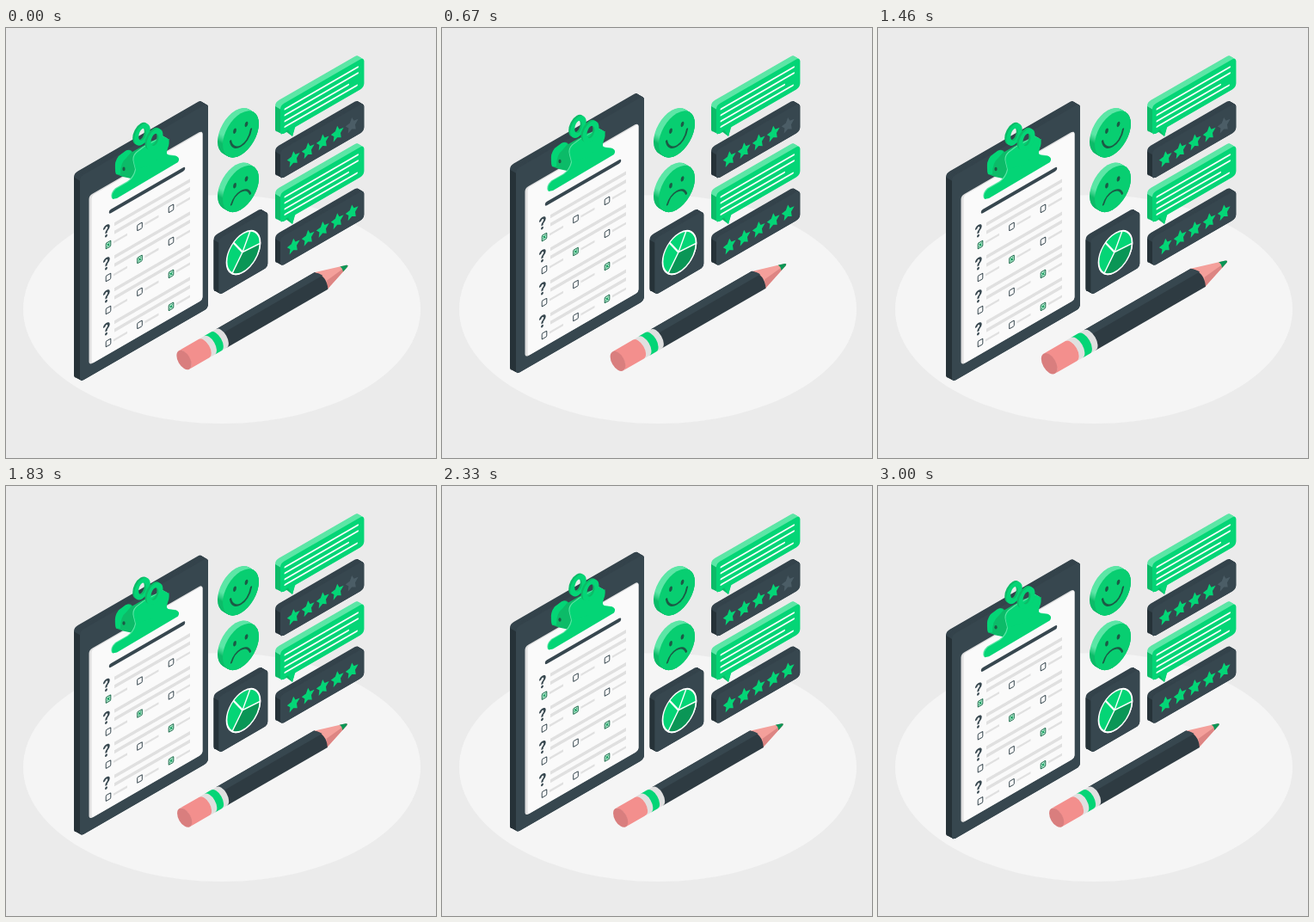
These frames come from a looping animation (500 by 500 pixels, 3040 ms). An HTML page:

```html
<!DOCTYPE html>
<html lang="en">
<head>
<meta charset="utf-8">
<title>Survey</title>
<style>
html, body { margin: 0; width: 100%; height: 100%; overflow: hidden; background: #ebebeb; }
svg { display: block; width: 100%; height: 100%; }
</style>
</head>
<body>
<svg id="stage" viewBox="0 0 500 500"></svg>
<script>
const GREEN = '#04d576', LIGHT = '#5ce6a6', SHADE = '#0cbb68', DEEP = '#0a9656';
const SLATE = '#37474f', DARK = '#263238', BODY = '#2e3b42', GREY = '#e0e0e0', INK = '#1c5a45';
const SLATES = [SLATE, '#34434b', DARK];

const range = n => [...Array(n).keys()];
const repeat = (n, f) => range(n).map(f).join('');

// Upright isometric plane: x in screen pixels, y straight down.
const plane = (x, y, s) => `<g transform="matrix(1 -.577 0 1 ${x} ${y})">${s}</g>`;
const path = (d, fill, more = '') => `<path d="${d}" fill="${fill}" ${more}/>`;
const line = (x1, x2, y, color, width, cap = 'butt') =>
  path(`M${x1} ${y}H${x2}`, 'none', `stroke="${color}" stroke-width="${width}" stroke-linecap="${cap}"`);
const rect = (x, y, w, h, r, fill) =>
  `<rect x="${x}" y="${y}" width="${w}" height="${h}" rx="${r}" fill="${fill}"/>`;

// Rounded panel with depth towards the upper left.
function slab(x, y, w, h, [front, top, left], inner, d = 6) {
  const r = 4.5, up = d * 7 / 6;
  return plane(x, y,
    repeat(13, i => rect(-d * (1 - i / 12), -up * (1 - i / 12), w, h, r, top)) +
    path(`M0 ${r}V${h - r}Q0 ${h - 1} 2 ${h - .5}L${2 - d} ${h - up}Q${-d} ${h - up - 1} ${-d} ${h - up - r}V${r - up}Z`, left) +
    rect(0, 0, w, h, r, front) + inner);
}

function question(i) {
  const y = 78 + 38 * i, checked = [0, 1, 2, 2][i];
  const boxes = repeat(3, k => {
    const x = 33 + 36.5 * k, on = k === checked;
    return line(x + 6, x + 22, y + 20.5, GREY, 2.6) +
      `<rect x="${x - 2.8}" y="${y + 16.5}" width="5.6" height="6.6" rx="1" fill="${on ? '#c9f5de' : 'none'}" stroke="${on ? '#1c6a4b' : SLATE}"/>` +
      (on ? path(`M${x - 1.5} ${y + 18}l3 3.6m0 -3.6l-3 3.6`, 'none', `stroke="${DEEP}"`) : '');
  });
  return line(40, 128, y, GREY, 4) + line(40, 128, y + 9.5, GREY, 4) + boxes +
    `<text transform="translate(31 ${y + 9.5}) scale(.87 1)" text-anchor="middle" font-family="Inter, Arial, sans-serif" font-weight="700" font-size="19" fill="${SLATE}">?</text>`;
}

function clip() {
  const plate = 'M124 197Q121.5 191 128 185L142 177Q149 172 151 163L149 155Q147 148 152 143L160 137L183 124L188.5 127Q191 131 188 138Q185 145 190 146L198 147Q203 149 200 154L129 196Z';
  const oval = (x, y, rx, color) => plane(x, y,
    `<ellipse rx="${rx}" ry="9.2" fill="none" stroke="${color}" stroke-width="5"/>`);
  const ring = (x, y, rx) => oval(x - 2, y - 1.2, rx, SHADE) + oval(x, y, rx, GREEN);
  return '<g transform="translate(0 2.2)">' + ring(158.5, 122, 6.8) +
    path('M127 165Q126 155 131 147L139 141Q144 138 147 142L170 129L190 127L186 146L150 174L136 171L128 168Z', SHADE) +
    path('M127 161Q126 153 131 147L139 141Q143 139 146 142L140 149Q133 154 133 168L128 168Z', GREEN) +
    `<ellipse cx="137" cy="162" rx="1.6" ry="2.3" fill="${INK}"/>` +
    `<g transform="translate(-1 -.6)">${path(plate, LIGHT)}</g>` + path(plate, GREEN) +
    ring(173, 128, 7) +
    path('M152 149Q153 145 157 142L161 136Q167 143 175 138L183 128L187 131L184 145L170 157L153 162Z', GREEN) + '</g>';
}

const clipboard = slab(86, 173.5, 149, 238.5, SLATES,
  rect(10.5, 28, 132, 197, 4, GREY) + rect(13.5, 29.5, 129, 195.5, 3, '#fafafa') +
  line(36, 120, 60.5, SLATE, 4.5, 'round') + repeat(4, question), 7) + clip();

function face(y, mouth) {
  const disc = (k, color) => plane(273 - k, y - k * .577, `<ellipse rx="21" ry="24.3" fill="${color}"/>`);
  return repeat(13, i => disc(6 - i / 2, 'url(#rim)')) + disc(0, '#08ce71') + plane(273, y,
    [-7, 6.5].map(x => `<ellipse cx="${x}" cy="-7.8" rx="1.9" ry="2.9" fill="${INK}"/>`).join('') +
    path(mouth, 'none', `stroke="${INK}" stroke-width="2.2" stroke-linecap="round"`));
}

const pie = slab(247.5, 245.3, 56.8, 65.5, SLATES,
  `<g transform="translate(28.5 32.2)" stroke="#fff" stroke-width="1.7" stroke-linejoin="round">
    <ellipse rx="19.5" ry="22.5" fill="${GREEN}"/>
    ${path('M-1 -1L19.5 .5A19.5 22.5 0 0 1 -13 16.8Z', DEEP)}
    ${path('M-1 -1L-11.5 -18M-1 -1L8 -20.5', 'none')}
  </g>`);

function bubble(y) {
  return slab(319, y, 97.3, 35, [GREEN, LIGHT, SHADE],
    path('M6 33.5L14 44L17 33.5Z', SHADE) + path('M9 33.5L14 44L18 33.5Z', GREEN) +
    [[7.5, 90], [14.5, 90], [21.5, 79], [28, 89]].map(([dy, end]) => line(5.5, end, dy, '#fff', 2, 'round')).join(''));
}

function rating(y, score) {
  const star = range(10).map(i => {
    const a = i * Math.PI / 5, r = i % 2 ? 4.6 : 9;
    return [r * .866 * Math.sin(a), -r * Math.cos(a)].map(v => v.toFixed(2));
  }).join(' ');
  return slab(319, y, 97.3, 33.3, SLATES, repeat(5, i =>
    `<polygon points="${star}" transform="translate(${15.2 + 17 * i} 18.2)" fill="${i < score ? GREEN : '#4b5d66'}"/>`));
}

// Pencil along its own axis, later turned by 30 degrees.
function pencilArt() {
  const band = (a, b, w, color) =>
    path(`M${a} ${-w}H${b}A6.5 ${w} 0 0 1 ${b} ${w}H${a}A6.5 ${w} 0 0 0 ${a} ${-w}Z`, color);
  return path('M78 -12.2L114 -1.2Q117 0 114 1.4L81 12.2Z', '#f4a09b') +
    path('M86 3L115.5 0L114 1.4L81 12.2Z', '#dd8583') +
    path('M107 -3.4L114 -1.2Q117 0 114 1.4L107 3.7Q109 0 107 -3.4Z', DEEP) +
    path('M-53 -12.3H78Q89 -2 82 12.3H-53Z', BODY) +
    path('M-53 -12.3H78Q83 -8 84.5 -4.5H-47Z', SLATE) +
    band(-76, -53, 12.4, GREY) + band(-69, -60, 12.4, GREEN) +
    band(-102.8, -76, 12.2, '#f38f8d') +
    '<ellipse cx="-102.8" rx="7" ry="12.2" fill="#d97e7e"/>';
}

const stage = document.getElementById('stage');
stage.innerHTML = `<linearGradient id="rim" x2=".3" y2="1">
    <stop offset=".3" stop-color="${LIGHT}"/><stop offset=".45" stop-color="${SHADE}"/>
  </linearGradient>
  <ellipse cx="251" cy="327" rx="231" ry="133" fill="#f5f5f5"/>
  <g id="board">${clipboard}</g>
  ${face(123.5, 'M-12 1C-9 18 9 18 12 1')}${face(187, 'M-11 12C-7 0 7 0 11 12')}
  ${pie}${rating(244.2, 5)}${bubble(192)}${rating(142.7, 4)}${bubble(90)}
  <g id="pencil"><g transform="rotate(-30) translate(0 -2.6)">${pencilArt()}</g></g>`;

const board = document.getElementById('board'), pencil = document.getElementById('pencil');
const BEATS = [[0, 1], [300, 1.1], [900, 1], [1200, 1], [1500, 1.1], [1800, 1], [3000, 1]];

function beat(t) {
  const i = BEATS.findIndex(([end], k) => k && t <= end);
  const [a, from] = BEATS[i - 1], [b, to] = BEATS[i];
  return from + (to - from) * (t - a) / (b - a);
}

function draw(now) {
  const t = Math.min(now % 3040 + 20, 3000);
  const lift = 10 * (1 - Math.abs(t % 1500 / 750 - 1));
  board.setAttribute('transform', `translate(0 ${-lift})`);
  pencil.setAttribute('transform', `translate(298 336.5) scale(${beat(t)})`);
}

const start = performance.now();
function tick() {
  draw(performance.now() - start);
  requestAnimationFrame(tick);
}
tick();
</script>
</body>
</html>
```
